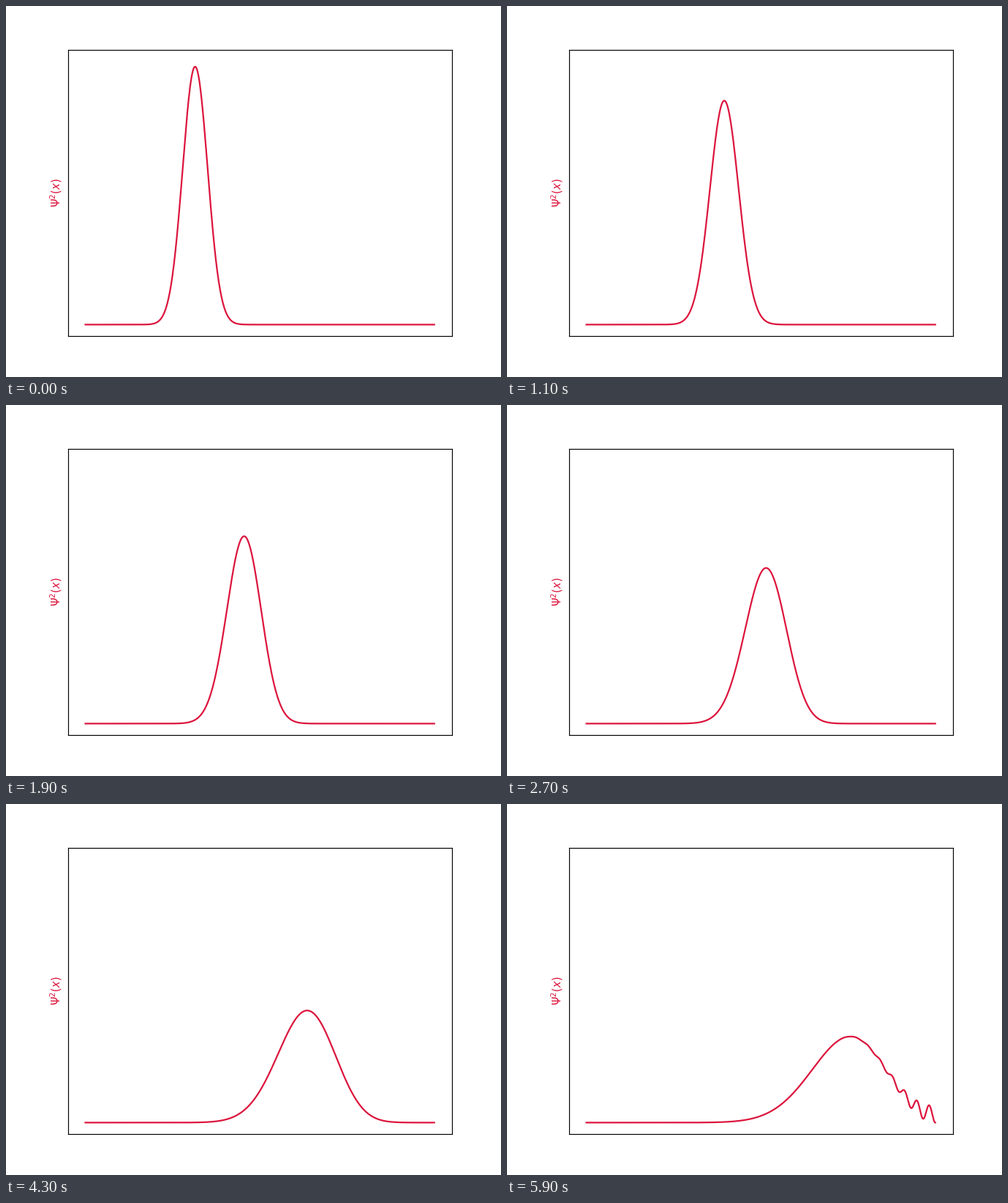
These frames come from a looping animation (677x507 px, 6000 ms). A matplotlib script:

```python
import numpy as np
import matplotlib.pyplot as plt
from matplotlib.animation import FuncAnimation

W, H, DPI = 677, 507, 105.83
FRAMES, INTERVAL = 60, 100

# Plot area in stage pixels: default margins of a 6.4 by 4.8 inch page
PAGE_W, PAGE_H = 6.4 * DPI, 4.8 * DPI
LEFT, RIGHT = 0.125 * PAGE_W, 0.9 * PAGE_W
TOP, BOTTOM = H - 0.88 * PAGE_H, H - 0.11 * PAGE_H
MARGIN = (RIGHT - LEFT) * 0.05 / 1.1
WALL_L, WALL_R = LEFT + MARGIN, RIGHT - MARGIN
BASE, HEIGHT = 435.4, 353.3

# Gaussian wave packet between two hard walls, with lattice dispersion
CELLS = 500
START, SIGMA, K0 = 253.8, 17.0, 0.1187
STIFFNESS, SPACING = 30.97, 4.2
T0 = 1.4

x = np.linspace(WALL_L, WALL_R, CELLS + 1)
n = np.arange(1, CELLS // 2)
modes = np.sin(np.pi * np.outer(np.arange(CELLS + 1), n) / CELLS)
k = np.pi * n / (WALL_R - WALL_L)
omega = STIFFNESS / SPACING**2 * (1 - np.cos(k * SPACING))

packet = np.exp(-((x - START) / (2 * SIGMA))**2 + 1j * K0 * x)
weights = 2 / CELLS * modes.T @ packet


def density(t):
    psi = modes @ (weights * np.exp(-1j * omega * t))
    return np.abs(psi)**2


# The small excess keeps rounding from losing a pixel
fig, ax = plt.subplots(figsize=((W + 0.01) / DPI, (H + 0.01) / DPI),
                       dpi=DPI, facecolor="white")
fig.subplots_adjust(left=LEFT / W, right=RIGHT / W,
                    bottom=1 - BOTTOM / H, top=1 - TOP / H)
ax.set_xlim(LEFT, RIGHT)
ax.set_ylim(BOTTOM, TOP)
ax.set_xticks([])
ax.set_yticks([])
ax.set_ylabel(r"$\Psi^2(x)$", color="crimson", fontsize=10)
line, = ax.plot([], [], color="crimson", lw=1.5)


def draw(i):
    line.set_data(x, BASE - HEIGHT * density(i + T0))
    return line,


anim = FuncAnimation(fig, draw, frames=FRAMES, interval=INTERVAL,
                     repeat=True, repeat_delay=0)
plt.show()
```
